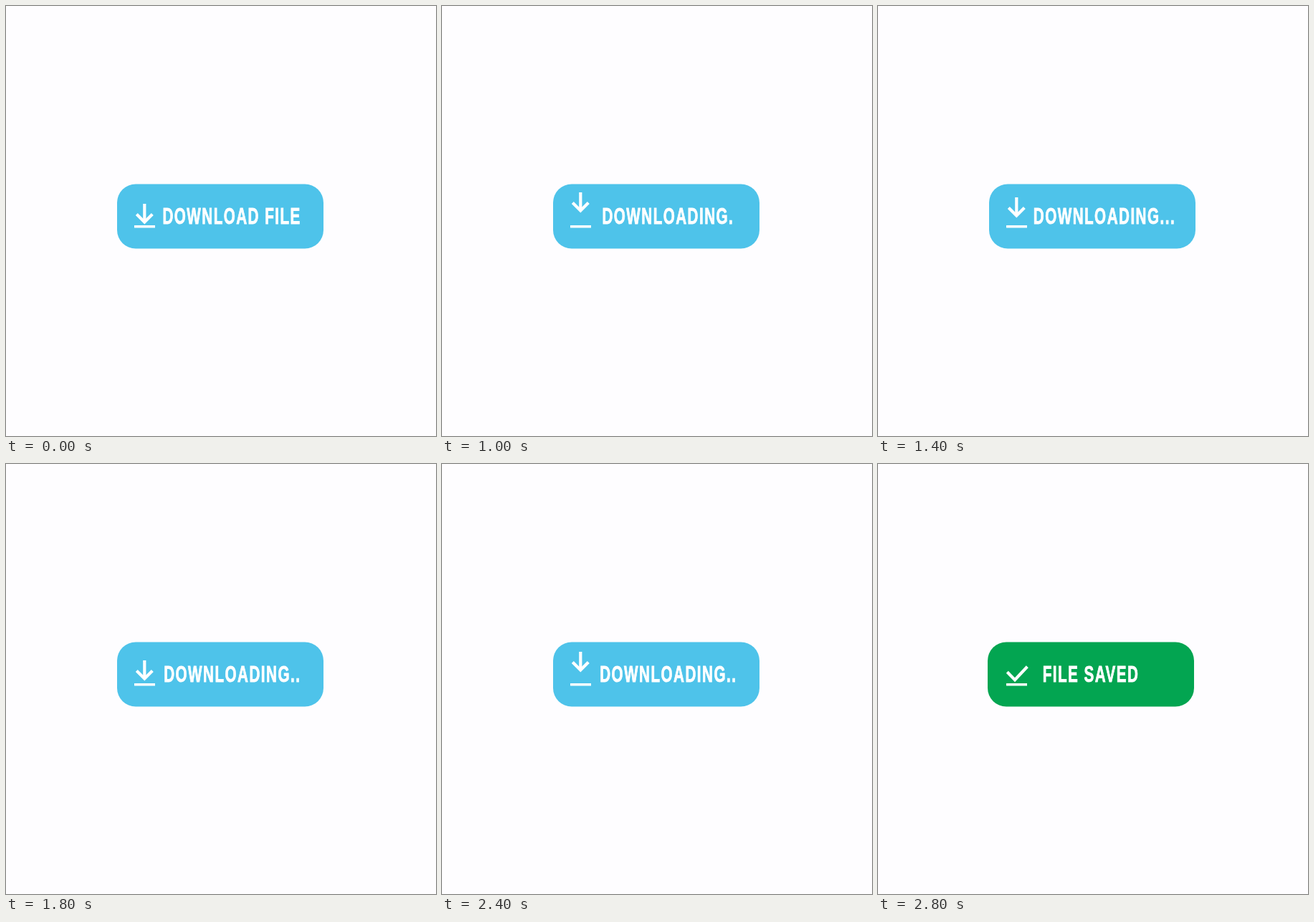
An HTML page that plays this animation: 600 px wide and 600 px high, repeating every 3.8 s.

```html
<!DOCTYPE html>
<html lang="en">
<head>
<meta charset="utf-8">
<title>Download button</title>
<style>
  html, body { margin: 0; width: 100%; height: 100%; overflow: hidden; background: #fefdff; }
  svg { display: block; width: 100vw; height: 100vh; }
  text {
    font: bold 32px "Liberation Sans", Arial, sans-serif;
    letter-spacing: 2.3px;
    fill: #fff; stroke: #fff; stroke-width: 1px;
  }
  .line { fill: none; stroke: #fff; stroke-width: 4.2px; }
</style>
</head>
<body>
<svg viewBox="0 0 600 600">
  <rect id="button" y="248.5" width="288" height="90" rx="26"/>
  <rect x="179" y="306" width="29" height="3.5" fill="#fff"/>
  <g id="arrow" class="line">
    <path d="M193.3 0V26"/>
    <path d="M182.3 14.5l11 11l11 -11"/>
  </g>
  <path id="check" class="line" d="M180.3 290.3L191 301.3L208.3 282.7"/>
  <text id="label"></text>
</svg>
<script>
  const LOOP = 3800;
  const BLUE = '#4ec3ea', GREEN = '#03a551';
  const [button, arrow, check, label] =
    ['button', 'arrow', 'check', 'label'].map(id => document.getElementById(id));

  const busyX = [223.4, 220.2, 216.8];       // text start for one, two, three dots
  const drop = [260, 262, 267, 271, 274, 276]; // arrow top, easing down to the tray

  function stateAt(t) {
    if (t < 1000) return { text: 'DOWNLOAD FILE', x: 218.4, top: 276 };
    if (t >= 2800) return { text: 'FILE SAVED', x: 229.7, done: true };
    const step = Math.floor((t - 1000) / 200);
    const dots = step % 3;
    return {
      text: 'DOWNLOADING' + '.'.repeat(dots + 1),
      x: busyX[dots],
      top: drop[step % drop.length]
    };
  }

  function draw(t) {
    const { text, x, top = 0, done = false } = stateAt(t);
    button.setAttribute('x', done ? 153 : 155);
    button.setAttribute('fill', done ? GREEN : BLUE);
    arrow.setAttribute('visibility', done ? 'hidden' : 'visible');
    check.setAttribute('visibility', done ? 'visible' : 'hidden');
    arrow.setAttribute('transform', `translate(0 ${top})`);
    label.setAttribute('transform', `translate(${x} 303.6) scale(.645 1)`);
    if (label.textContent !== text) label.textContent = text;
  }

  const start = performance.now();
  function tick() {
    draw((performance.now() - start) % LOOP);
    requestAnimationFrame(tick);
  }
  tick();
</script>
</body>
</html>
```
